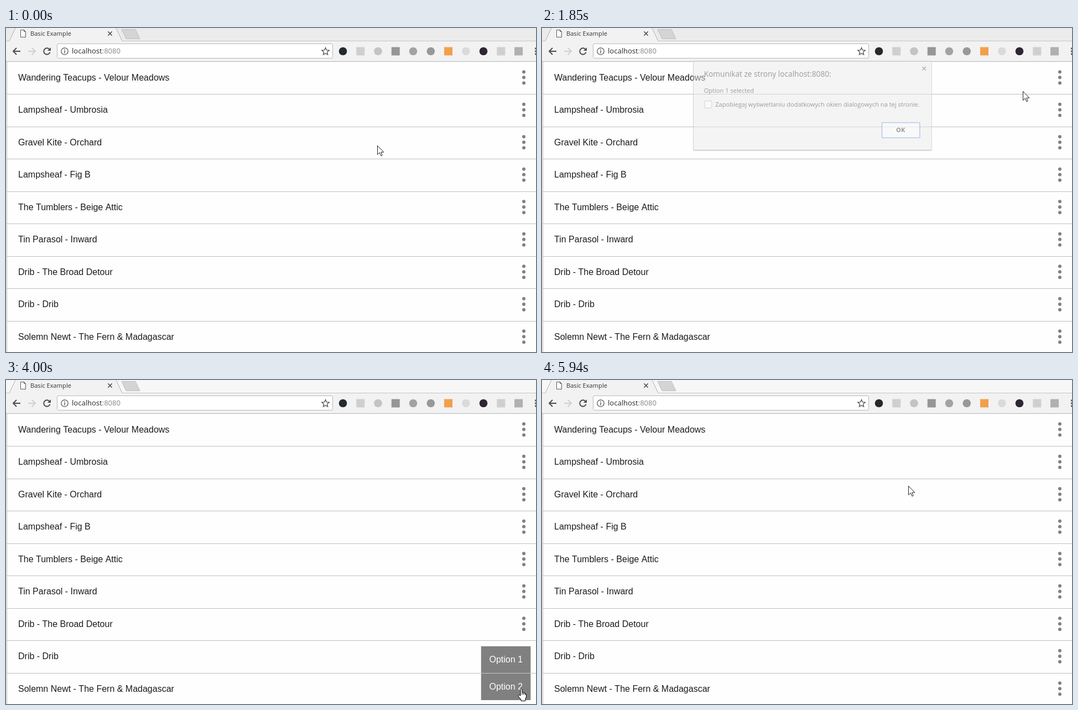
Recreate the animation shown at these times as an HTML page with a canvas. Size 958x585 px, loop 6260 ms.

```html
<!DOCTYPE html>
<html lang="en">
<head>
<meta charset="utf-8">
<title>Basic Example</title>
<style>
  html, body { margin: 0; width: 100%; height: 100%; overflow: hidden; background: #fff; }
  canvas { display: block; }
</style>
</head>
<body>
<canvas id="stage" width="958" height="585"></canvas>
<script>
const ctx = document.getElementById('stage').getContext('2d');
const LOOP = 6260, STEP = 77.5, FADE = 240;
const TOP = 61, ROW = 58.5;
const SANS = '"Liberation Sans", Arial, sans-serif';
const UI = '"Open Sans", "Noto Sans", sans-serif';

const albums = [
  'Wandering Teacups - Velour Meadows',
  'Lampsheaf - Umbrosia',
  'Gravel Kite - Orchard',
  'Lampsheaf - Fig B',
  'The Tumblers - Beige Attic',
  'Tin Parasol - Inward',
  'Drib - The Broad Detour',
  'Drib - Drib',
  'Solemn Newt - The Fern & Madagascar'
];

// Each choice: menu opens, option is hovered, picked, dialog confirmed
const choices = [
  { option: 1, y: 69, open: 1050, hover: 1280, pick: 1750, ok: 2480 },
  { option: 2, y: 481, open: 3990, hover: 4300, pick: 4930, ok: 5580 }
];

// Pointer waypoints: time, x, y
const path = [
  [130, 671, 212], [680, 921, 92], [1290, 921, 92], [1600, 921, 99],
  [2400, 670, 173], [2620, 670, 173], [3080, 754, 375], [3385, 900, 538],
  [3700, 930, 557], [4858, 930, 557], [4935, 887, 555], [5480, 662, 191]
];

const clamp = v => Math.max(0, Math.min(1, v));
const ease = u => u * u * (3 - 2 * u);

// The picture advances in even steps
const stepTime = t => Math.floor((t + 33) / STEP) * STEP - 25;

function pointerAt(t) {
  let [, x, y] = path[0];
  for (let i = 1; i < path.length; i++) {
    const [t0, x0, y0] = path[i - 1], [t1, x1, y1] = path[i];
    const u = ease(clamp((t - t0) / (t1 - t0)));
    x += (x1 - x0) * u;
    y += (y1 - y0) * u;
  }
  return [Math.round(x), Math.round(y)];
}

function rect(x, y, w, h, fill) {
  ctx.fillStyle = fill;
  ctx.fillRect(x, y, w, h);
}

function paint(path, fill, stroke, width = 1) {
  if (fill) { ctx.fillStyle = fill; ctx.fill(path); }
  if (stroke) { ctx.strokeStyle = stroke; ctx.lineWidth = width; ctx.stroke(path); }
}

function shape(d, ...style) {
  paint(new Path2D(d), ...style);
}

function box(x, y, w, h, r, ...style) {
  const p = new Path2D();
  p.roundRect(x, y, w, h, r);
  paint(p, ...style);
}

function disc(x, y, r, ...style) {
  const p = new Path2D();
  p.arc(x, y, r, 0, Math.PI * 2);
  paint(p, ...style);
}

function label(s, x, y, font, fill) {
  ctx.font = font;
  ctx.fillStyle = fill;
  ctx.fillText(s, x, y);
}

function cross(x, y, r, color, width) {
  shape(`M${x - r} ${y - r}l${2 * r} ${2 * r}m0 ${-2 * r}l${-2 * r} ${2 * r}`, null, color, width);
}

function arrow(x, y, dir, color) {
  shape(`M${x} ${y}h${-13 * dir}m${6 * dir} -6l${-6 * dir} 6l${6 * dir} 6`, null, color, 1.9);
}

function star(x, y, r) {
  const p = new Path2D();
  for (let i = 0; i < 10; i++) {
    const a = i * Math.PI / 5 - Math.PI / 2, d = i % 2 ? r * 0.45 : r;
    p.lineTo(x + Math.cos(a) * d, y + Math.sin(a) * d);
  }
  p.closePath();
  paint(p, null, '#555', 1.3);
}

function drawTabs(active) {
  rect(0, 0, 958, 24, active ? '#f7f7f7' : '#ebebeb');
  rect(0, 23, 958, 1, '#c6c6c6');
  shape('M6 24L17 0H199L210 24Z', '#f2f2f2');
  shape('M6 23.5L17 0M199 0L210 23.5', null, '#b0b0b0');
  shape('M209 2.5H234L242 19.5H217Z', '#d4d4d4', '#c0c0c0');
  shape('M26.5 3.5h6l3 3v10h-9zM32.5 3.5v3h3', '#fff', '#555');
  label('Basic Example', 44, 14, '11.1px ' + UI, '#333');
  cross(188, 10, 3.6, '#555', 1.5);
}

function drawExtensions() {
  const colors = ['#24292e', '#cfcfcf', '#c4c4c4', '#969696', '#a3a3a3', '#989898',
    '#f0a04b', '#dadada', '#2d2632', '#cfcfcf', '#b0b0b0'];
  colors.forEach((color, i) => {
    const x = 609 + i * 31.75;
    if (i % 3 && i !== 4 && i !== 2 && i !== 5 && i !== 7 && i !== 8 || i % 3 === 0 && i) box(x - 7.5, 34.5, 15, 15, 0, color);
    else disc(x, 42, 7.3, color);
  });
}

function drawToolbar() {
  rect(0, 24, 958, 37, '#f2f2f2');
  rect(0, 60, 958, 1, '#b2b2b2');
  arrow(26, 42, 1, '#4a4a4a');
  arrow(40, 42, -1, '#cfcfcf');
  const reload = new Path2D();
  reload.arc(74, 42, 5.7, 0.25, Math.PI * 1.75);
  paint(reload, null, '#4a4a4a', 1.9);
  shape('M81 35v6h-6z', '#4a4a4a');
  box(92.5, 28.5, 498, 26, 2, '#fff', '#b8b8b8');
  disc(106, 42, 6.2, null, '#555', 1.3);
  rect(105.3, 41, 1.5, 4.5, '#555');
  rect(105.3, 38.3, 1.5, 1.6, '#555');
  const font = '13.05px ' + UI;
  label('localhost', 119, 46, font, '#2b2b2b');
  label(':8080', 119 + ctx.measureText('localhost').width, 46, font, '#858585');
  star(577.5, 42.5, 7);
  drawExtensions();
  for (const d of [-5, 0, 5]) disc(957.5, 42 + d, 1.7, '#5a5a5a');
}

function drawList(hoverRow) {
  rect(0, TOP, 958, 524, '#fefefe');
  albums.forEach((name, i) => {
    const y = i * ROW;
    if (i) rect(1, Math.round(TOP - 0.1 + y), 957, 1, '#bfbfbf');
    label(name, 22, Math.round(94.9 + y), '16px ' + SANS, '#1c1c1c');
    for (const d of [-10, 0, 10]) disc(936, 89.2 + d + y, 3, i === hoverRow ? '#666' : '#808080');
  });
  rect(1, TOP, 1, 524, '#b4b4b4');
}

function drawMenu(y, hover) {
  rect(858, y - 1, 91, 98, '#dcdcdc');
  for (const n of [1, 2]) {
    const top = y + (n - 1) * 49;
    rect(859, top, 89, 48, hover === n ? '#666' : '#808080');
    label('Option ' + n, 873.5, top + 29, '16px ' + SANS, '#fff');
  }
  rect(859, y + 48, 89, 1, '#c6c6c6');
}

function drawDialog(option, alpha) {
  const scale = 0.958 + 0.042 * alpha, small = '11.35px ' + UI, ink = '#2e2e2e';
  ctx.save();
  ctx.globalAlpha = alpha;
  ctx.translate(488.5, 140.5);
  ctx.scale(scale, scale);
  ctx.translate(-488.5, -140.5);
  box(267.5, 58.5, 442, 166, 2, 'rgba(0,0,0,.14)');
  box(268.5, 57.5, 441, 165, 2, '#fbfbfb', '#b0b0b0');
  rect(269, 222, 440, 1, '#9c9c9c');
  cross(695.5, 71.5, 3.4, '#6b7799', 1.8);
  label('Komunikat ze strony localhost:8080:', 288, 87, '14px ' + UI, ink);
  label(`Option ${option} selected`, 288, 116, small, ink);
  box(289.5, 131.5, 13, 13, 1, '#fff', '#a0a0a0');
  label('Zapobiegaj wyświetlaniu dodatkowych okien dialogowych na tej stronie.', 309, 142, small, ink);
  box(617.5, 171.5, 70, 28, 1, '#fff', '#4d82d6', 1.3);
  ctx.textAlign = 'center';
  label('OK', 652, 189, 'bold 11.4px ' + UI, '#222');
  ctx.restore();
}

function drawPointer(x, y, hand) {
  ctx.save();
  ctx.lineJoin = 'round';
  if (hand) {
    ctx.translate(x - 5, y);
    shape('M5 13V2Q6.500 -1 8 2V7.500Q10 6 10.800 8.500Q13 7 13.500 9.500Q15.500 9 15.500 11V15L13.500 19.500V22.500H6V20L1 14Q0 10 5 13Z', '#fff', '#000');
    shape('M8 7.500v4M10.800 8.500v3M13.500 9.500v2.500', null, '#000', 0.9);
  } else {
    ctx.translate(x + 0.5, y + 0.5);
    shape('M0 0V16L3.700 12.500L6.300 18.300L8.700 17.300L6.200 11.700H11.300Z', '#fff', '#222');
  }
  ctx.restore();
}

function draw(time) {
  const t = stepTime(time);
  const [x, y] = pointerAt(t);
  const hand = x > 905;
  const menu = choices.find(c => t >= c.open && t < c.pick);
  const dialog = choices.find(c => t >= c.pick && t < c.ok + FADE);

  drawTabs(t >= 900 && !dialog);
  drawToolbar();
  drawList(hand && !menu ? Math.floor((y - TOP) / ROW) : -1);
  if (menu) drawMenu(menu.y, t >= menu.hover ? menu.option : 0);
  if (dialog) {
    const fadeIn = clamp((t - dialog.pick + 22) / FADE);
    const fadeOut = clamp(1 - (t - dialog.ok) / FADE);
    drawDialog(dialog.option, Math.min(fadeIn, fadeOut));
  }
  drawPointer(x, y, hand);
}

const began = performance.now();
function tick() {
  draw((performance.now() - began) % LOOP);
  requestAnimationFrame(tick);
}
tick();
</script>
</body>
</html>
```
